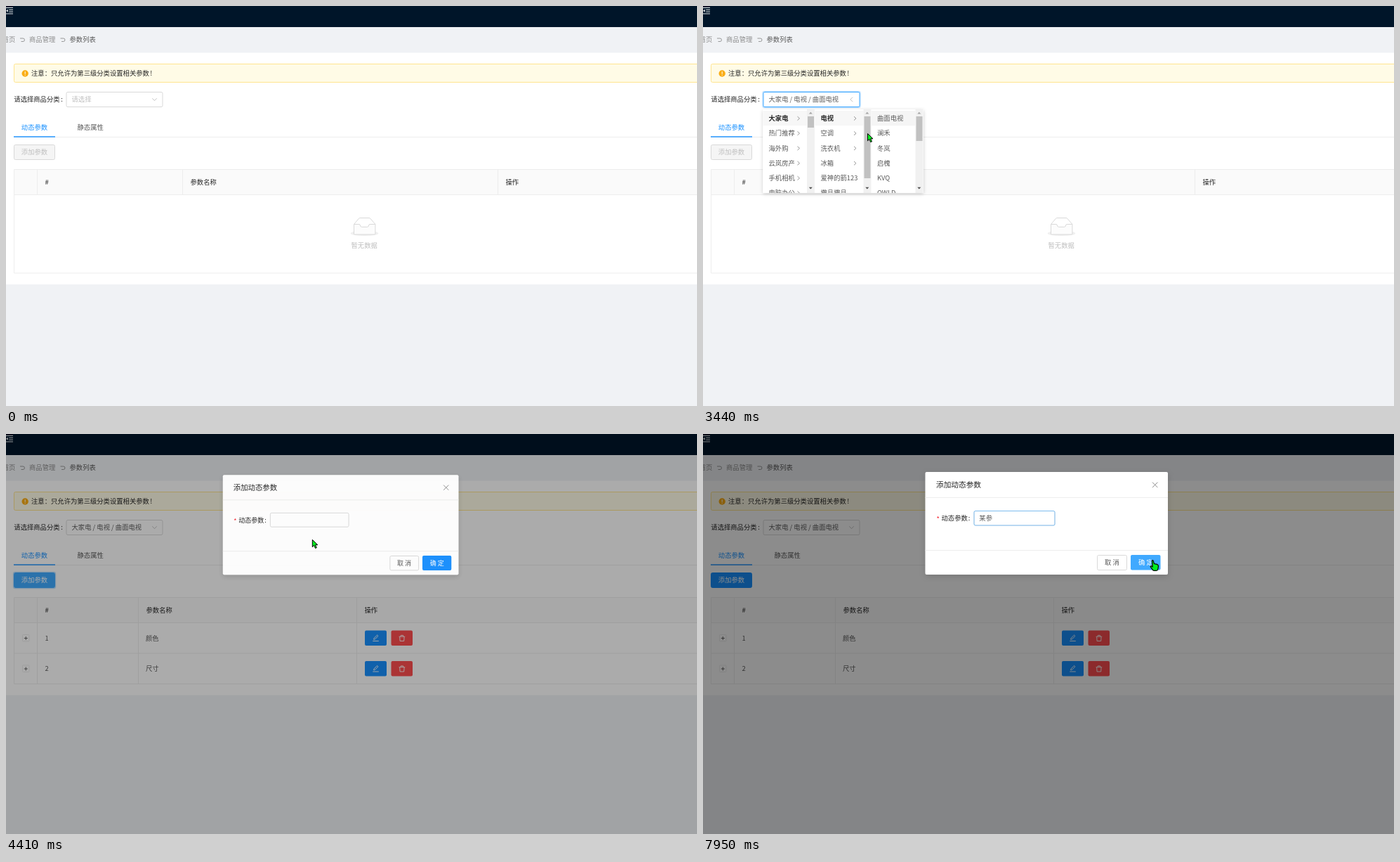
Write an HTML page that moves like this. It is 984 px wide and 569 px high and loops after 8000 ms.

```html
<!DOCTYPE html>
<html lang="zh-CN">
<head>
<meta charset="utf-8">
<title>参数列表</title>
<style>
html, body { margin: 0; width: 100%; height: 100%; overflow: hidden; background: #f0f2f5; }
svg { display: block; width: 984px; height: 569px; }
text { font-family: "Noto Sans CJK SC", "Noto Sans CJK", "Noto Sans", sans-serif; white-space: pre; }
</style>
</head>
<body>
<svg id="stage" viewBox="0 0 984 569" xmlns="http://www.w3.org/2000/svg"></svg>
<script>
const LOOP = 8000, FS = 9.333;
const BLUE = '#1890ff', HOVER = '#40a9ff', DARK = '#262626', MID = '#595959', GRAY = '#8c8c8c', PALE = '#bfbfbf', LINE = '#ededed';

// Markup helpers: text is placed by its left edge and vertical centre
const text = (x, y, s, fill = MID, size = FS, extra = '') =>
  `<text x="${x}" y="${y + size * .37}" font-size="${size}" fill="${fill}" ${extra}>${s}</text>`;
const rect = (x, y, w, h, fill, stroke = 'none', rx = 0, extra = '') =>
  `<rect x="${x}" y="${y}" width="${w}" height="${h}" fill="${fill}" stroke="${stroke}" rx="${rx}" ${extra}/>`;
const path = (d, stroke, w = 1, fill = 'none', extra = '') =>
  `<path d="${d}" stroke="${stroke}" stroke-width="${w}" fill="${fill}" ${extra}/>`;
const group = (id, body, extra = '') => `<g id="${id}" ${extra}>${body}</g>`;
const hline = (y, x = 11, end = 984) => path(`M${x} ${y}H${end}`, LINE);
const glow = (id, x, y, w, h) => rect(x - 1, y - 1, w + 2, h + 2, 'none', BLUE, 2.5, `id="${id}" stroke-width="1.4" stroke-opacity=".28"`);

const page = () => {
  const sep = x => path(`M${x} 46h4.2a2.2 2.2 0 0 1 0 4.5h-2.6`, GRAY, .9);
  return rect(0, 0, 984, 569, '#f0f2f5') + rect(0, 0, 984, 30, '#001529') +
    path('M0 2.5H10M4.2 5.4H10M4.2 8.2H10M0 11H10', '#e6e8ea', 1) + path('M0 6.8L2.8 4.8V8.8Z', 'none', 0, '#e6e8ea') +
    text(-5.3, 47.7, '首页', GRAY) + sep(20) + text(33, 47.7, '商品管理', GRAY) + sep(77.5) + text(90.5, 47.7, '参数列表') +
    rect(0, 66.5, 984, 329.5, '#fff', 'none', 0, 'id="card"') +
    rect(11.5, 82.5, 990, 26, '#fffbe6', '#ffe58f', 2) +
    '<circle cx="27.2" cy="96" r="4.7" fill="#faad14"/>' + path('M27.2 93.2V96.8M27.2 97.8V98.9', '#fff', 1) +
    text(36, 96, '注意：只允许为第三级分类设置相关参数', DARK) + text(205.3, 96, '!', DARK) +
    text(11.3, 133, '请选择商品分类', DARK) + text(78.2, 133, ':', DARK) +
    glow('selGlow', 86, 122.5, 137, 21) + rect(86, 122.5, 137, 21, '#fff', '#d9d9d9', 2, 'id="sel"') +
    text(93.5, 133, '', PALE, FS, 'id="selText"') +
    path('M-3.2 -1.7L0 1.7L3.2 -1.7', PALE, .9, 'none', 'id="chev"') +
    hline(186.5) + rect(11, 185.3, 59, 1.4, BLUE) + text(21.8, 172.3, '动态参数', BLUE) + text(101.5, 172.3, '静态属性') +
    glow('addGlow', 11.5, 197.5, 58, 21) + rect(11.5, 197.5, 58, 21, '#f5f5f5', '#d9d9d9', 2, 'id="add"') +
    text(21.8, 208, '添加参数', PALE, FS, 'id="addText"');
};

const tableHead = (cols, bottom) => rect(11.5, 232.5, 990, 36, '#fafafa') +
  path(`M1000 232.5H11.5V${bottom}H1000`, LINE) + hline(268.5) + text(55.5, 250.7, '#', DARK) +
  [44.5, ...cols].map((x, i) => path(`M${x} 232.5V${i && bottom > 375 || bottom > 375 ? 268.5 : bottom}`, LINE) +
    text(x + 11, 250.7, ['', '参数名称', '操作'][i], DARK)).join('');

const emptyTable = () => tableHead([251.5, 700.5], 380) +
  '<ellipse cx="510.5" cy="323.4" rx="19.8" ry="3.6" fill="#f0f0f0"/>' +
  path('M495.5 310.5h7.6q1 0 1.2 1.5q.4 2.3 2.2 2.3h8q1.800 0 2.200 -2.300q.200 -1.500 1.200 -1.500h8v13.500q0 1-1 1h-28.400q-1 0-1-1z', '#d9d9d9', 1, '#fcfcfc') +
  path('M495.500 310.500l7-8.300q.700-.700 1.600-.700h13q.900 0 1.600.700l7.200 8.300', '#d9d9d9') +
  text(491.500, 340.3, '暂无数据', PALE);

const tableRow = (n, name, y) => rect(23.5, y - 5, 9.5, 9.5, '#fff', '#ededed', 1) +
  path(`M25.8 ${y}h5M28.300 ${y - 2.5}v5`, MID, .9) + text(55.5, y, n) + text(199, y, name) +
  rect(511, y - 11, 31, 21.5, BLUE, 'none', 2) +
  path(`M523.6 ${y + 1.8}l.4-1.800 4.600-4.500 1.400 1.400-4.600 4.500zM522.300 ${y + 4}h8.500`, '#fff', .9) +
  rect(548.5, y - 11, 30.500, 21.5, '#ff4d4f', 'none', 2) +
  path(`M559.600 ${y - 2.300}h8.600M562.300 ${y - 2.300}v-1.800h3.200v1.800M560.700 ${y - 2}l.4 6h5.600l.4-6`, '#fff', .9);

const fullTable = () => tableHead([188.5, 499.5], 355.5) + tableRow(1, '颜色', 290.5) + hline(312) + tableRow(2, '尺寸', 334);

// One cascader column: left edge, width, thumb height, items, how many have arrows
const column = (i, x, w, thumb, items, arrows) => {
  const bar = x + w - 11.5, mid = bar + 5.3;
  const rows = items.map((s, k) => {
    const y = 159.700 + 21.25 * k;
    return (k ? '' : rect(x, 149, w - 11.5, 21.300, i < 2 ? '#f7f7f7' : '#f5f5f5', 'none', 0, `id="pick${i}"`)) +
      text(x + 8, y, s, MID, FS, k ? '' : `id="item${i}"`) +
      (k < arrows ? path(`M${bar - 13.500} ${y - 2.500}l3 2.700-3 2.700`, GRAY, .9) : '');
  }).join('');
  return group('col' + i, rect(x, 147, w, 119, '#fff') + rows + rect(bar, 147, 11, 119, '#f1f1f1') +
    rect(bar + 1, 157, 9, thumb, '#c1c1c1') +
    path(`M${mid - 2.500} 153.500h5l-2.500-2.700z`, 'none', 0, '#a3a3a3') + path(`M${mid - 2.500} 257.800h5l-2.500 2.700z`, 'none', 0, '#505050'));
};

const cascader = () => group('drop',
  rect(85.500, 147, 74, 119, '#fff', 'none', 2, 'id="dropBox" filter="url(#soft)"') +
  '<g clip-path="url(#dropClip)">' +
  column(0, 85.5, 74, 16, ['大家电', '热门推荐', '海外购', '云岚房产', '手机相机', '电脑办公'], 6) +
  column(1, 159.5, 80.5, 88, ['电视', '空调', '洗衣机', '冰箱', '爱神的箭123', '撒旦撒旦'], 4) +
  column(2, 240, 74, 35, ['曲面电视', '澜禾', '冬岚', '启槐', 'KVQ', 'QWLD'], 0) + '</g>');

const modal = () => group('modal',
  rect(316.5, 54, 345.5, 146, '#fff', 'none', 2, 'filter="url(#deep)"') +
  text(332, 72.2, '添加动态参数', DARK, 10.667) + path('M640 68.700l7.400 7.400M647.400 68.700l-7.400 7.400', GRAY, 1) +
  path('M316.500 90.500H662M316.500 165.500H662', LINE) +
  text(332.5, 121, '*', '#f5222d') + text(339.5, 119.7, '动态参数', DARK) + text(377.700, 119.7, ':', DARK) +
  glow('inGlow', 386, 109.5, 115, 20.5) + rect(386, 109.5, 115, 20.5, '#fff', '#d9d9d9', 2) +
  rect(386, 109.5, 115, 20.5, 'none', HOVER, 2, 'id="inBlue"') +
  text(393.3, 119.7, '', MID, FS, 'id="inText"') + rect(393, 113.3, 1, 12.700, '#222', 'none', 0, 'id="caret"') +
  rect(561.500, 172.500, 42, 21, '#fff', '#d9d9d9', 2) + text(572, 183, '取 消') +
  rect(609, 172, 42.500, 21.5, BLUE, 'none', 2, 'id="ok"') + text(620, 183, '确 定', '#fff', FS, 'font-weight="500"'));

const popups = () => group('auto',
  rect(385.500, 131, 127.500, 82, '#fff', '#d0d0d0', 2.500, 'stroke-width=".6" filter="url(#soft)"') +
  ['123', '2', '大小'].map((s, i) => text(393.5, 147.5 + 24 * i, s, '#333', 9)).join('')) +
  group('ime', rect(393.500, 134.500, 420, 41, '#fff', '#d9d9d9', 2) +
    text(401, 145, '', '#333', 10, 'id="pinyin"') + text(401, 164, '', '#333', 10.500, 'id="words"'));

const cursors = () => group('cursor',
  path('M.5 .5V10.800L2.900 8.500L4.700 12.600L6.500 11.800L4.700 7.800H8Z', '#000', 1, '#00f020', 'id="arrow"') +
  path('M-1.200 0q1.200-1 1.800.300L2 4.500L6 5.300Q8 6 8 8.300L7.300 12.500Q7 14.300 5 14.300H1.500Q-.200 14-1.200 11.800L-3.200 9Q-3.500 7.300-1.800 7.700L-.300 8.800Z', '#000', 1.2, '#00f020', 'id="hand"') +
  group('beam', path('M-3.800-5.700H3.800M0-5.700V5.700M-3.800 5.700H3.800', '#000', 2.200) + path('M0-4.500V4.500', '#1fb52a', .8)));

const blur = (id, dy, dev, o) => `<filter id="${id}" x="-20%" y="-30%" width="140%" height="160%"><feDropShadow dx="0" dy="${dy}" stdDeviation="${dev}" flood-opacity="${o}"/></filter>`;
const stage = document.getElementById('stage');
stage.innerHTML = `<defs>${blur('soft', 1.3, 2.6, .2)}${blur('deep', 2.7, 4, .15)}<clipPath id="dropClip">${rect(85, 147, 230, 119, '#fff')}</clipPath></defs>` +
  page() + group('empty', emptyTable()) + group('full', fullTable()) + cascader() +
  rect(0, 0, 984, 569, '#000', 'none', 0, 'id="mask"') + modal() + popups() + cursors();

const el = {};
stage.querySelectorAll('[id]').forEach(n => el[n.id] = n);
const show = (id, on) => el[id].setAttribute('display', on ? 'inline' : 'none');
const set = (id, attrs) => { for (const k in attrs) el[id].setAttribute(k, attrs[k]); };
const say = (id, s) => { if (el[id].textContent !== s) el[id].textContent = s; };
const ramp = (t, from, len) => Math.min(1, Math.max(0, (t - from) / len));
const out5 = p => 1 - (1 - p) ** 5;

// Pointer route: time, x, y, shape from then on
const ROUTE = [
  [350, 612, 552, 'arrow'], [860, 36, 195, 'arrow'], [1040, 36, 195, 'arrow'], [1270, 309, 205, 'arrow'],
  [1520, 166, 137, 'hand'], [1740, 163, 138.500, 'hand'], [1840, 150, 152, 'hand'], [1890, 150, 152, 'arrow'],
  [2230, 368, 177, 'arrow'], [2680, 118, 154, 'hand'], [2780, 118, 156, 'hand'], [2980, 182, 159, 'hand'],
  [3060, 182, 159, 'hand'], [3260, 256, 160, 'hand'], [3380, 256, 162, 'arrow'], [3440, 234, 181, 'arrow'],
  [3540, 234, 181, 'arrow'], [3960, 42, 206, 'hand'], [4260, 46, 207, 'arrow'], [4360, 435, 154, 'arrow'],
  [4600, 442, 119, 'beam'], [7350, 442, 119, 'arrow'], [7800, 636, 177, 'hand'], [7940, 640.500, 180, 'hand'], [LOOP, 640.500, 180, 'hand']
];

function pointer(t) {
  show('cursor', t >= 350);
  if (t < 350) return;
  const i = ROUTE.findIndex((k, n) => n && t < k[0]);
  const a = ROUTE[i - 1], b = ROUTE[i], p = ramp(t, a[0], b[0] - a[0]), e = p * p * (3 - 2 * p);
  set('cursor', { transform: `translate(${a[1] + (b[1] - a[1]) * e} ${a[2] + (b[2] - a[2]) * e})` });
  ['arrow', 'hand', 'beam'].forEach(s => show(s, s === a[3]));
}

function dropdown(t) {
  const open = out5(ramp(t, 1590, 200)), shut = ramp(t, 3400, 200) ** 5, k = open * (1 - shut);
  show('drop', t >= 1590 && t < 3600);
  set('drop', { opacity: k, transform: `translate(0 147) scale(1 ${.8 + .2 * k}) translate(0 -147)` });
  const starts = [2780, 3060, 3260], cols = 1 + (t >= 2780) + (t >= 3060);
  set('dropBox', { width: [74, 154.500, 228.500][cols - 1] });
  starts.forEach((s, i) => {
    show('col' + i, i < cols);
    show('pick' + i, t >= s);
    if (i < 2) set('item' + i, { 'font-weight': t >= s ? 600 : 400, fill: t >= s ? DARK : MID });
  });
  const turn = 180 * (ramp(t, 1590, 180) - ramp(t, 3390, 100));
  set('chev', { transform: `translate(211.500 133) rotate(${turn})` });
}

function form(t) {
  const chosen = t >= 3380, loaded = t >= 3620, focus = t >= 1540 && t < 4265;
  say('selText', chosen ? '大家电 / 电视 / 曲面电视' : '请选择');
  set('selText', { fill: chosen ? MID : PALE });
  set('sel', { stroke: t >= 1500 && t < 4265 ? HOVER : '#d9d9d9' });
  show('selGlow', focus);
  show('empty', !loaded);
  show('full', loaded);
  set('card', { height: loaded ? 305 : 329.5 });
  const hot = t >= 3900 && t < 4500, fill = hot ? HOVER : BLUE;
  set('add', { fill: loaded ? fill : '#f5f5f5', stroke: loaded ? fill : '#d9d9d9' });
  set('addText', { fill: loaded ? '#fff' : PALE });
  show('addGlow', t >= 4265 && t < 4500);
}

function dialog(t) {
  const p = out5(ramp(t, 4265, 300)), s = .2 + .8 * p;
  set('mask', { opacity: .45 * ramp(t, 4265, 200) });
  show('modal', t >= 4265);
  set('modal', { opacity: p, transform: `translate(47 207) scale(${s}) translate(-47 -207)` });
  set('inBlue', { opacity: ramp(t, 4600, 200) * (1 - .6 * ramp(t, 7850, 150)) });
  set('inGlow', { opacity: ramp(t, 4850, 300) * (1 - ramp(t, 7750, 200)) });
  const value = t < 6350 ? '' : t < 6740 ? '某参赛' : '某参';
  say('inText', value);
  const beat = t - (t < 6350 ? 4850 : 6350);
  show('caret', t >= 4850 && t < 7750 && Math.floor(beat / 530) % 2 === 0);
  set('caret', { x: 393 + value.length * 9.5 });
  set('ok', { fill: t >= 7700 ? HOVER : BLUE });
  show('auto', t >= 4850 && t < 5530);
  const typed = Math.min(9, 1 + Math.floor((t - 5530) / 80));
  show('ime', t >= 5530 && t < 6350);
  say('pinyin', 'moucansai'.slice(0, Math.max(0, typed)).replace(/^(mou)(c.*)/, "$1'$2").replace(/(can)(s)/, "$1'$2"));
  say('words', typed < 4 ? '1.某  2.谋  3.眸  4.牟  5.缪' : typed < 7 ? '1.某参  2.某餐  3.某  4.谋  5.眸' : '1.某参赛  2.某参  3.某  4.谋  5.眸');
}

function draw(now) {
  const t = now % LOOP;
  form(t);
  dropdown(t);
  dialog(t);
  pointer(t);
}

const begin = performance.now();
function tick() {
  draw(performance.now() - begin);
  requestAnimationFrame(tick);
}
tick();
</script>
</body>
</html>
```
